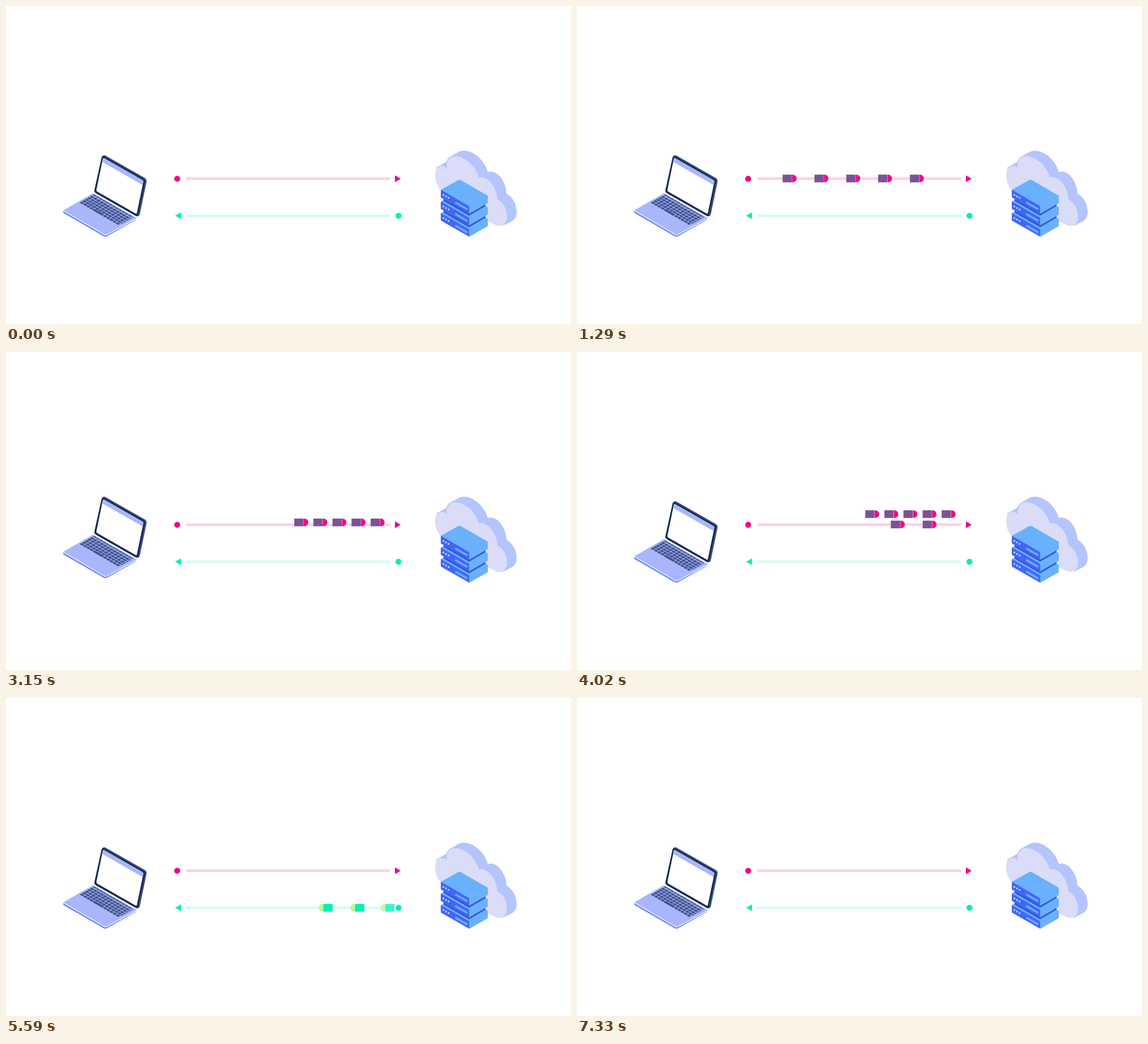
An HTML page without scripts that plays this animation: 998 px wide and 561 px high, repeating every 7.9 s.

```html
<!DOCTYPE html>
<html lang="en">
<head>
<meta charset="utf-8">
<title>Request queue</title>
<style>
/* --n is the shared clock: it counts ticks, everything else is computed from it */
@property --n { syntax: "<number>"; inherits: true; initial-value: 0; }

html, body { margin: 0; width: 100%; height: 100%; overflow: hidden; background: #fff; }
svg { display: block; width: 100%; height: 100%; animation: clock 7.9s -4ms infinite linear; }

@keyframes clock {
  0%        { --n: 0;   animation-timing-function: steps(56); }
  21.26582% { --n: 56;  animation-timing-function: steps(5); }
  23.41772% { --n: 61;  animation-timing-function: steps(40); }
  38.60759% { --n: 101; animation-timing-function: steps(3); }
  39.87342% { --n: 104; animation-timing-function: steps(39); }
  54.68354% { --n: 143; animation-timing-function: steps(3); }
  55.94937% { --n: 146; animation-timing-function: steps(97); }
  92.78481% { --n: 243; animation-timing-function: steps(17); }
  100%      { --n: 260; }
}

/* --t: tick of departure, --j: ticks since then, --lag: slow start */
.packet {
  --speed: 11.24;
  --j: calc(var(--n) - var(--t));
  --slow: max(0, 5.2 - var(--j));
  --lag: calc(.62 * var(--slow) * var(--slow));
}
.request {
  --in: calc(295.8 + var(--speed) * var(--j) + var(--lag));
  --x: var(--in);
  --lift: 0;
  opacity: calc(min(var(--j) / 4, (666.4 - var(--x)) / 22));
  transform: translate(calc(1px * (var(--x))), calc(-18.3px * (var(--lift))));
}
/* queued requests stop at a rest place, step aside, then drain in order */
.queued {
  --t: calc(17 + 5 * var(--k));
  --rest: calc(644.1 - 33.72 * var(--k));
  --x: calc(min(var(--in), var(--rest)) + var(--speed) * max(0, var(--n) - 150 - 2 * var(--k)));
  --lift: clamp(0, min((var(--n) - 103) / 5, (150 - var(--n)) / 5), 1);
}
.reply {
  opacity: calc(min(var(--j) / 4, (36 - var(--j)) / 4));
  transform: translateX(calc(1px * (698.4 - var(--speed) * var(--j) - var(--lag))));
}

.laptop {
  --hop: calc(max(0, min(var(--n), 6 - var(--n)))
    + max(0, min(var(--n) - 10, 16 - var(--n)))
    + max(0, min(var(--n) - 20, 26 - var(--n)))
    + max(0, min(var(--n) - 30, 36 - var(--n)))
    + max(0, min(var(--n) - 103, 109 - var(--n))));
  transform: translateY(calc(-8px * var(--hop)));
}
.server {
  --hop: calc(max(0, min(var(--n) - 64, 70 - var(--n)))
    + max(0, min(var(--n) - 176, 182 - var(--n)))
    + max(0, min(var(--n) - 186, 192 - var(--n)))
    + max(0, min(var(--n) - 196, 202 - var(--n)))
    + max(0, min(var(--n) - 206, 212 - var(--n))));
  transform: translateY(calc(-6.6px * var(--hop)));
}

.pink { fill: #fa0082; }
.teal { fill: #00efb5; }
.keys { stroke: #3b5088; stroke-width: 4.1; stroke-dasharray: 5.4 1.1; fill: none; }
</style>
</head>
<body>
<svg viewBox="0 0 998 561" xmlns="http://www.w3.org/2000/svg">
  <defs>
    <g id="request">
      <path fill="#7d5197" d="M0 297.5h16.4v13.6H0z"/>
      <path class="pink" d="M16.9 297.5h1a6.7 6.8 0 0 1 0 13.6h-1z"/>
    </g>
    <g id="error">
      <path fill="#f0911d" d="M8.4 363.3H6.8a6.8 6.8 0 0 0 0 13.6h1.6z"/>
      <path fill="#f9592b" d="M9 363.3h16.4v13.6H9z"/>
    </g>
    <g id="success">
      <path fill="#b1fa99" d="M9 363.3H6.8a6.8 6.8 0 0 0 0 13.6H9z"/>
      <path class="teal" d="M8.4 363.3h16.2v13.6H8.4z"/>
    </g>
    <g id="unit">
      <path fill="#69b1fc" d="M768 326q0-1.5 1.5-2.4L799 307q2-1.2 4 0l46.5 26.7q1.5 .9 1.5 2.3v10.5q0 1.2-1 1.8L818 366.5z"/>
      <path fill="#4167fa" d="M768 326q0-1.8 1.6-.9L817 352.5q1.2 .8 1.2 2v11.8L769 338.2q-1-.6-1-1.7z"/>
      <g fill="#cdd7ff">
        <circle cx="772.6" cy="333.3" r="1.6"/>
        <circle cx="777.2" cy="335.9" r="1.6"/>
        <circle cx="781.8" cy="338.5" r="1.6"/>
      </g>
      <path stroke="#6eaafc" stroke-width="3.6" d="M793.5 346.5L815 358.8"/>
    </g>
    <path id="gap" fill="#3757d6" d="M773 338l45 26 29-17v6l-29 17-45-26z"/>
  </defs>

  <g stroke-width="4.6" stroke-linecap="round">
    <path stroke="#fed2e4" d="M320.1 304.6H676.6"/>
    <path stroke="#d3fdf3" d="M319.5 370.1H675.8"/>
  </g>

  <use href="#request" class="packet request" style="--t:2"/>
  <use href="#request" class="packet request" style="--t:7"/>
  <use href="#request" class="packet request queued" style="--k:0"/>
  <use href="#request" class="packet request queued" style="--k:1"/>
  <use href="#request" class="packet request queued" style="--k:2"/>
  <use href="#request" class="packet request queued" style="--k:3"/>
  <use href="#request" class="packet request queued" style="--k:4"/>
  <use href="#request" class="packet request" style="--t:105"/>
  <use href="#request" class="packet request" style="--t:110"/>

  <use href="#error" class="packet reply" style="--t:60"/>
  <use href="#error" class="packet reply" style="--t:65"/>
  <use href="#success" class="packet reply" style="--t:172"/>
  <use href="#success" class="packet reply" style="--t:177"/>
  <use href="#success" class="packet reply" style="--t:182"/>
  <use href="#success" class="packet reply" style="--t:187"/>
  <use href="#success" class="packet reply" style="--t:192"/>
  <use href="#success" class="packet reply" style="--t:197"/>
  <use href="#success" class="packet reply" style="--t:202"/>
  <use href="#success" class="packet reply" style="--t:207"/>

  <circle class="pink" cx="302.4" cy="304.7" r="5.3"/>
  <path class="pink" d="M687 298.7l10.3 6-10.3 6z"/>
  <circle class="teal" cx="693.3" cy="370.1" r="5.3"/>
  <path class="teal" d="M309.2 364.1l-10.5 6 10.5 6z"/>

  <g class="laptop">
    <path fill="#7088f6" d="M101 361v3q0 1 1 1.6l70.5 40.6q3 1.6 6 0l50-28.2q1.5-1 1.5-2.2v-3z"/>
    <path fill="#a9b6fb" stroke="#fff" stroke-width="1.3" d="M101.5 361.2q-1.2-.8 .2-1.7l52-30 79 44.5-54.2 29.3q-2.5 1.3-5 0z"/>
    <g class="keys" transform="matrix(.866 .5 -.866 .5 155.6 332.2)">
      <path stroke-width="2.5" d="M0 1.5H80"/>
      <path d="M0 6.5H80M0 11.7H80M0 16.9H80M0 22.1H80"/>
      <path style="stroke-dasharray:5.4 1.1 5.4 1.1 5.4 1.1 5.4 1.1 20 1.1 5.4 1.1 5.4 1.1 5.4 1.1 5.4 1.1 5.4" d="M0 27.3H82"/>
    </g>
    <path fill="#3c5286" d="M170.5 264.5q3-2 5.5-.6l69.5 39.6q3.6 2.2 2.8 6.5l-11.8 57q-.8 3.5-4.5 4.5z"/>
    <path fill="#172a52" d="M168.6 268q1-4.5 5-2.7l69 39.2q4 2.3 3.2 6l-12.3 57.5q-.8 4-4.5 2.3l-70-39.8q-3.7-2.2-2.8-6z"/>
    <path fill="#fff" d="M171 269.7q.5-2.3 2.5-1.2l67.5 38.6q2 1.2 1.5 3.3l-11.3 54.5q-.5 2.3-2.5 1.2l-67.5-38.6q-2-1.2-1.5-3.3z"/>
    <path fill="#a9b6fb" d="M171 269.7q.5-2.3 2.5-1.2l67.5 38.6q2 1.2 1.5 3.3l-1.1 5.3-71.9-41z"/>
  </g>

  <g class="server">
    <path fill="#b4c4fc" d="M760 285l18-10.3c1-4.5 4-7.5 7-9.2l16-9C822 249.5 846 272 851 293c17-6 33 19 33 38 11 6 18 19 18 32 0 8-3 13-7 16l-17 8.6L768 325z"/>
    <path fill="#dadcf8" d="M768 325c-11-11-15-39-1-42.5 5-1 9 1 11.5 3.5C777 272 784 265 793 265c19 0 38 19 42 37.5 16-4 32 17 33 38.5 10 5 17 17 17 30 0 14-9 20-19 16l-16-8-40-50z"/>
    <use href="#unit" y="40.8"/>
    <use href="#gap" y="20.4"/>
    <use href="#unit" y="20.4"/>
    <use href="#gap"/>
    <use href="#unit"/>
  </g>
</svg>
</body>
</html>
```
